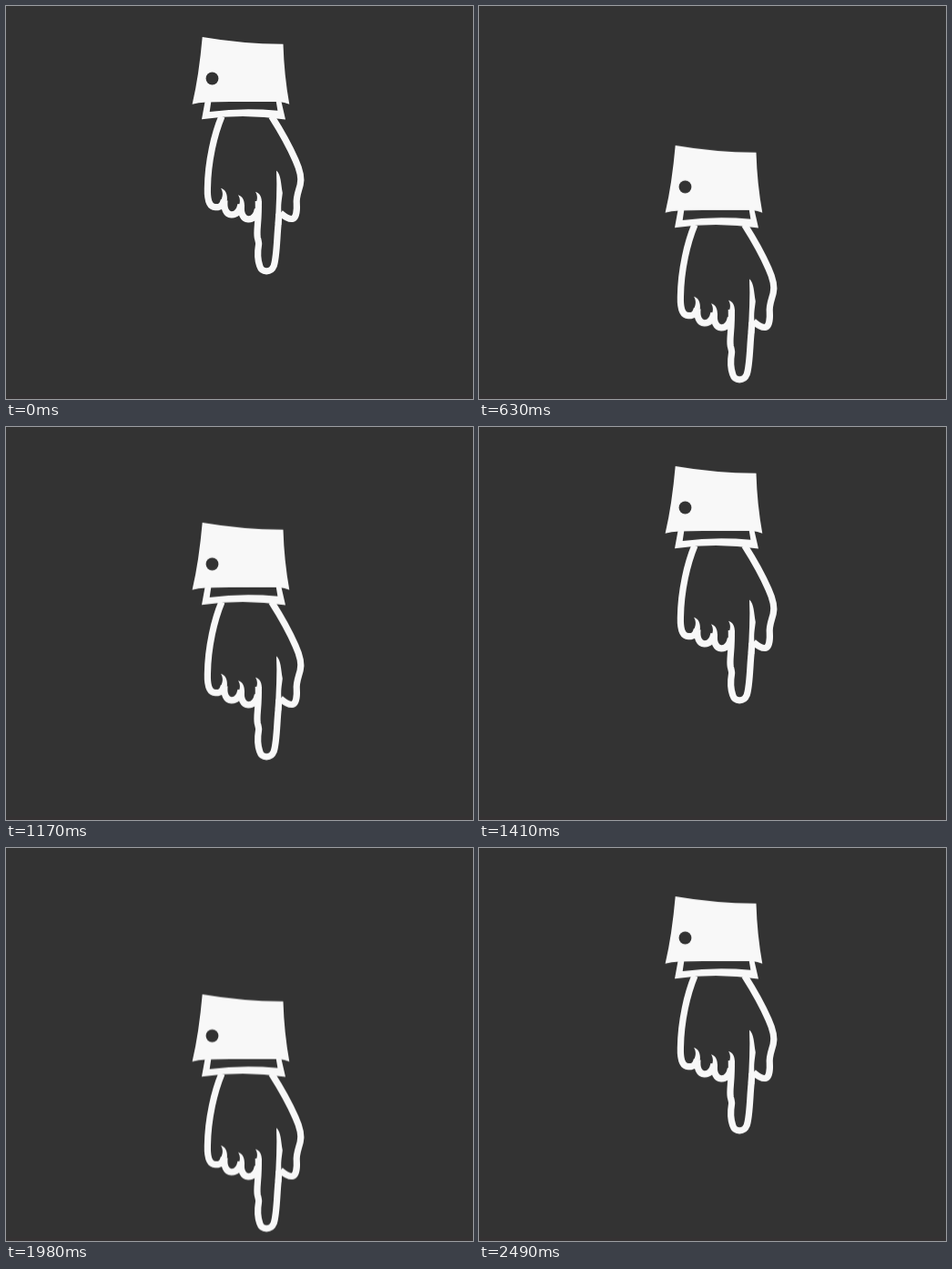
These frames come from a looping animation (513 px wide and 431 px high, 2.52 s). An HTML page:

```html
<!DOCTYPE html>
<html lang="en">
<head>
<meta charset="utf-8">
<title>Pointing hand</title>
<style>
  html, body { margin: 0; width: 100%; height: 100%; overflow: hidden; background: #333; }
  svg { display: block; width: 513px; height: 431px; fill: #f8f8f8; }
  .line { fill: none; stroke: #f8f8f8; stroke-width: 7.2; stroke-linejoin: round; }
  .dark { fill: #333; }
  #hand { animation: bob 2520ms infinite paused; }
  @keyframes bob {
    0% { transform: translateY(0); animation-timing-function: cubic-bezier(.35, .34, .7, 1); }
    33.2% { transform: translateY(135px); animation-timing-function: cubic-bezier(.37, 0, .63, 1); }
    60.5% { transform: translateY(0); animation-timing-function: cubic-bezier(.37, 0, .63, 1); }
    82.1% { transform: translateY(135px); animation-timing-function: cubic-bezier(.3, .15, .7, .8); }
    100% { transform: translateY(13px); }
  }
</style>
</head>
<body>
<svg viewBox="0 0 513 431">
  <defs>
    <path id="knuckle" class="line" d="M0 0c-1 9.5 2 15.5 7.5 15.8s9-4 10.5-11"/>
    <path id="gap" d="M0 0c5 1.2 7.7 7 6.8 14l-6.7-.4c2.5-5.5 2.4-9.5-.1-13.6z"/>
  </defs>
  <rect y="427" width="513" height="4" fill="#353233"/>
  <g id="hand">
    <!-- cuff, sleeve, button -->
    <path d="M218.7 104L215 124.3Q261 117.6 307 124.5L302.3 104Z"/>
    <path class="dark" d="M225.3 105L223.7 116Q260 111.4 298.4 114.8L296.8 105Z"/>
    <path d="M215.7 33.9Q258 41.2 304.5 41.8 305.5 76 311.3 107.7 306 105.7 300 105 258 104.4 220 105.6 211 106 204.6 107.7 212 76 215.7 33.9Z"/>
    <circle class="dark" cx="226.5" cy="79.5" r="6.9"/>
    <!-- little finger, two knuckles, index finger, thumb -->
    <path class="line" d="M237 121C229 140 221.8 170 221.4 200 221 213.5 223.5 220.4 230 220.7S238 217.5 239.4 213"/>
    <use href="#knuckle" x="240" y="213"/>
    <use href="#knuckle" x="258.5" y="218"/>
    <path class="line" d="M277.3 214C278 236 274.8 246 276.3 254 277 257 278 260 277.5 262 275.8 272 277 280 278.7 285 281 292.6 291 293 294.2 285 297.5 275 297.5 255 299 240L299.8 228"/>
    <path class="line" d="M291.7 121C300 134 311 153 318 169 323 180 324.8 190 323.2 196 321.5 203 318.5 209 319.3 217 319.8 225 318.5 231.5 315.5 233.2 311 234.8 306 231 301.5 227"/>
    <!-- tapered gaps -->
    <use href="#gap" x="236" y="199.8"/>
    <use href="#gap" x="255" y="207.3"/>
    <use href="#gap" x="274" y="203.8"/>
    <path d="M297 180.5C302 184 302 195 303.8 205 303 213 301.5 217 302.7 230L302.4 240H295.8C296.6 220 298 200 297 180.5Z"/>
  </g>
</svg>
<script>
  // Play the keyframes in 30 ms steps
  const LOOP = 2520, STEP = 30;
  const bob = document.getElementById('hand').getAnimations()[0];
  const start = performance.now();

  function draw() {
    const t = (performance.now() - start) % LOOP;
    bob.currentTime = Math.floor(t / STEP) * STEP;
    requestAnimationFrame(draw);
  }
  draw();
</script>
</body>
</html>
```
